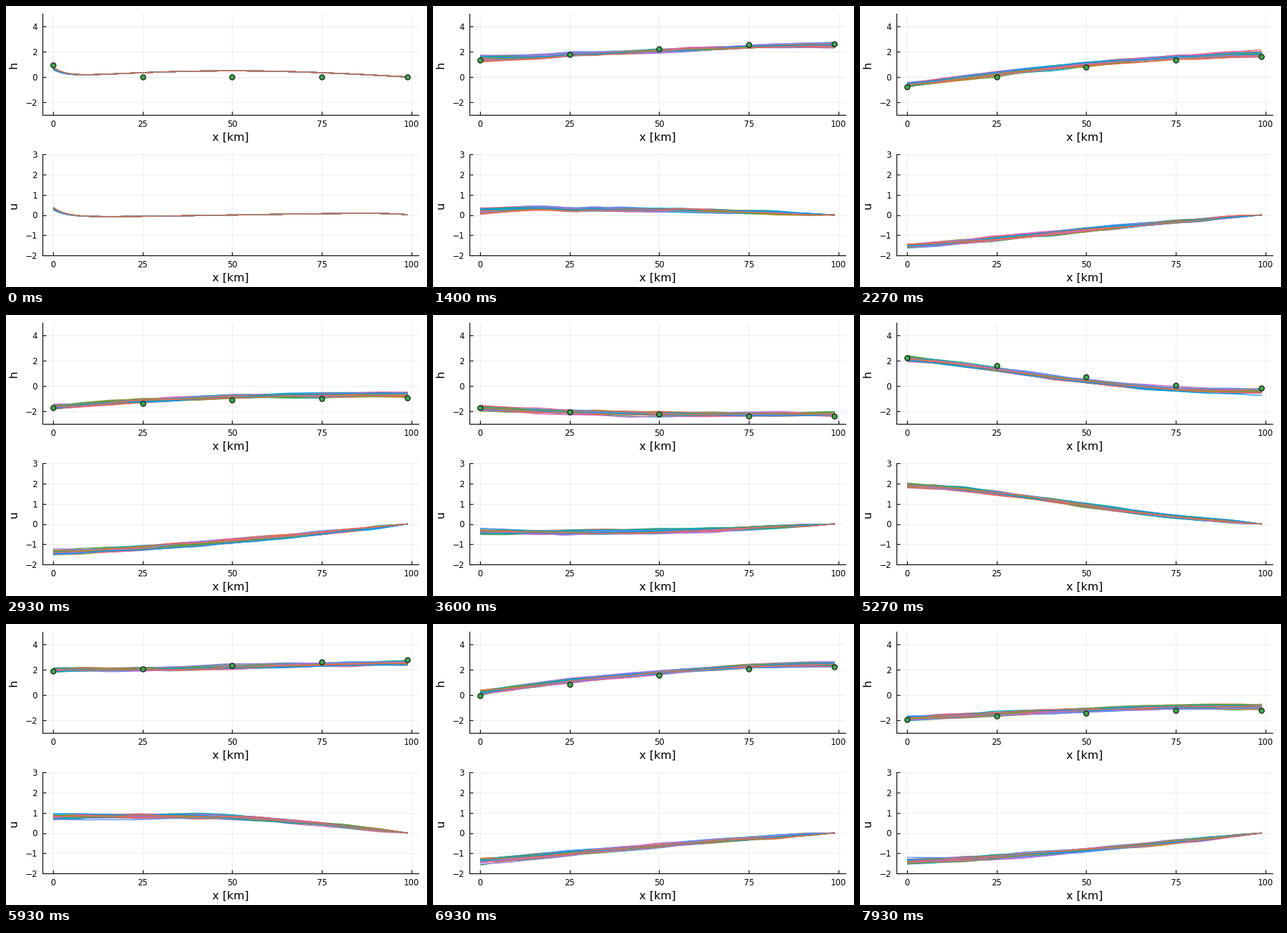
These frames come from a looping animation (600 by 400 pixels, 8000 ms). A matplotlib script:

```python
import numpy as np
import matplotlib.pyplot as plt
from matplotlib.animation import FuncAnimation
from matplotlib.collections import LineCollection

W, H = 600, 400
STEPS, LOOP_MS = 120, 8000
TICKS = 2 * STEPS
MEMBERS, CELLS, SUBSTEPS = 50, 100, 20

# Linear shallow water channel, closed at the right end
DEPTH, GRAVITY, FRICTION = 20.0, 9.81, 1 / (0.06 * 86400)
DT, DX = 600 / SUBSTEPS, 1000.0
GAUGE_LEAD = 1.3

PALETTE = ["#009afa", "#e36f47", "#3ea44e", "#c371d2", "#ac8e18", "#00aaae",
           "#ed5e93", "#c68225", "#00a98d", "#8e971e", "#00a9cc", "#9b7fe9",
           "#618df6", "#f06073", "#dd65b6", "#6c9f33"]
GREEN = PALETTE[2]

# Key points of the tide at the mouth: time step, level
TIDE = np.array([(0, 0.7), (8, 2.3), (13, 2.2), (21, 1.5), (34, -0.6),
                 (42, -1.5), (52, -1.82), (63, -1.05), (69, -0.35),
                 (78, 2.05), (88, 2.06), (100, 0.82), (111, -1.0),
                 (119, -1.87), (126, -2.05)])

x = np.arange(CELLS)
s = x / CELLS
stations = [0, 25, 50, 75, 99]


def hermite(t, tk, yk):
    """Smooth curve through the points (tk, yk)."""
    slope = np.gradient(yk, tk)
    i = np.clip(np.searchsorted(tk, t, side="right") - 1, 0, len(tk) - 2)
    step = tk[i + 1] - tk[i]
    p = (t - tk[i]) / step
    return ((2 * p**3 - 3 * p**2 + 1) * yk[i]
            + (p**3 - 2 * p**2 + p) * step * slope[i]
            + (3 * p**2 - 2 * p**3) * yk[i + 1]
            + (p**3 - p**2) * step * slope[i + 1])


def mouth_noise(count, alpha=0.72, std=0.09):
    """Autoregressive noise, one column per ensemble member."""
    rng = np.random.default_rng(7)
    z = rng.standard_normal((count, MEMBERS))
    z[0] *= 0.05
    for n in range(1, count):
        z[n] = alpha * z[n - 1] + std * np.sqrt(1 - alpha**2) * z[n]
    return z


def simulate(mouth, h, u):
    """Run the channel for every row of h and u, driven at the mouth."""
    hs, us = [h.copy()], [u.copy()]
    for before, after in zip(mouth, mouth[1:]):
        for p in np.arange(1, SUBSTEPS + 1) / SUBSTEPS:
            u[:, :-1] -= DT * GRAVITY / DX * np.diff(h, axis=1)
            u /= 1 + FRICTION * DT
            u[:, -1] = 0
            h[:, 1:] -= DT * DEPTH / DX * np.diff(u, axis=1)
            h[:, 0] = before * (1 - p) + after * p
        hs.append(h.copy())
        us.append(u.copy())
    return np.array(hs), np.array(us)


def build():
    """Ensemble level and flow, and the gauges of a run from rest."""
    t = np.arange(STEPS + 3)
    tide = hermite(t, TIDE[:, 0], TIDE[:, 1])
    mouth = tide[:, None] + mouth_noise(len(t))
    edge = np.exp(-s / 0.035)
    h = 0.5 * np.sin(np.pi * s) + mouth[0][:, None] * edge
    u = (0.6 * mouth[0][:, None] * edge
         - 0.092 * np.cos(np.pi * s) * (1 - s**20))
    rest = np.zeros(CELLS)
    hs, us = simulate(np.column_stack([tide, mouth]),
                      np.vstack([rest, h]), np.vstack([rest, u]))
    truth = hs[:, 0, stations]
    truth[0, 0] = tide[0]
    gauge = [np.interp(t[:STEPS] + GAUGE_LEAD, t, col) for col in truth.T]
    gauge = np.array(gauge).T
    return hs[:, 1:], us[:, 1:], gauge


def px(v):
    return v * 0.72


def add_panel(top, bottom, ylim, yticks, name, label_y):
    left, right = 52.1, 587.6
    ax = fig.add_axes([left / W, 1 - bottom / H,
                       (right - left) / W, (bottom - top) / H])
    ax.set_xlim(-2.97, 101.97)
    ax.set_ylim(*ylim)
    ax.set_xticks([0, 25, 50, 75, 100])
    ax.set_yticks(yticks)
    ax.set_axisbelow(True)
    ax.grid(color="#ebebeb", lw=px(0.9))
    ax.spines[["top", "right"]].set_visible(False)
    ax.spines[["left", "bottom"]].set_linewidth(px(1.1))
    ax.tick_params(direction="in", length=px(5), width=px(1.1),
                   labelsize=px(11.6))
    ax.tick_params(axis="x", pad=px(6.5))
    ax.tick_params(axis="y", pad=px(7.4))
    fig.text(320.3 / W, 1 - label_y / H, "x [km]", size=px(16),
             ha="center", va="center")
    fig.text(11 / W, 1 - (top + bottom + 1) / 2 / H, name, size=px(16),
             rotation=90, ha="center", va="center")
    colors = [PALETTE[i % len(PALETTE)] for i in range(MEMBERS)]
    lines = LineCollection([], colors=colors, linewidths=px(1.3), zorder=3)
    ax.add_collection(lines, autolim=False)
    return ax, lines


def segments(rows):
    return np.stack([np.broadcast_to(x, rows.shape), rows], axis=-1)


plt.rcParams["font.family"] = "DejaVu Sans"
fig = plt.figure(figsize=(W / 100, H / 100), dpi=100, facecolor="white")
ax_h, lines_h = add_panel(11.4, 155.2, (-3, 5), range(-2, 5, 2), "h", 187)
ax_u, lines_u = add_panel(211.1, 355.1, (-2, 3), range(-2, 4), "u", 387)
dots, = ax_h.plot(stations, [0] * len(stations), "o", color=GREEN,
                  ms=px(7.4), mec="black", mew=px(1), zorder=4)

level, flow, gauge = build()


def update(tick):
    n = min((tick + 1) // 2, STEPS - 1)  # nearest model step
    lines_h.set_segments(segments(level[n]))
    lines_u.set_segments(segments(flow[n]))
    dots.set_ydata(gauge[n])
    return lines_h, lines_u, dots


anim = FuncAnimation(fig, update, frames=TICKS, interval=LOOP_MS / TICKS,
                     init_func=lambda: update(0), repeat=True, repeat_delay=0)
plt.show()
```
